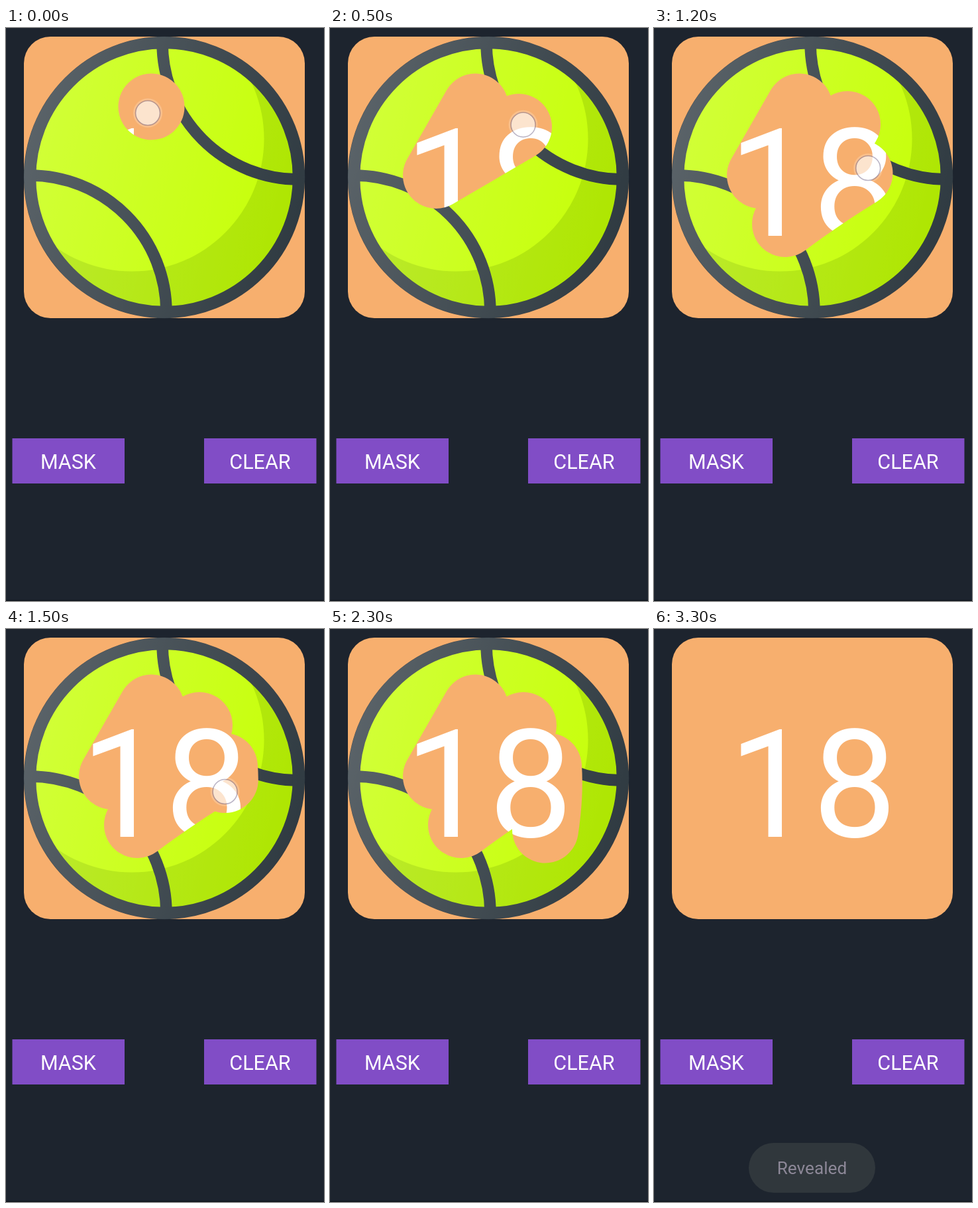
These frames come from a looping animation (480x863 px, 3.4 s). An HTML page:

```html
<!DOCTYPE html>
<html lang="en">
<head>
<meta charset="utf-8">
<title>Scratch card</title>
<style>
  html, body { margin: 0; width: 100%; height: 100%; overflow: hidden; background: #1d242e; }
  svg { display: block; width: 100vw; height: 100vh; }
  text { font-family: Roboto, Arial, sans-serif; fill: #fff; text-anchor: middle; }
  .number { font-size: 226px; }
  .button rect { width: 169.5px; height: 68px; fill: #814dc6; }
  .button text { font-size: 30.5px; }
  .seam { fill: none; stroke: #303b42; stroke-width: 17.5; }
  #scratch { fill: none; stroke: #000; stroke-width: 100; stroke-linecap: round; stroke-linejoin: round; }
  #toast text { font-size: 26.2px; fill: #8d8898; }
</style>
</head>
<body>
<svg viewBox="0 0 480 863">
  <defs>
    <linearGradient id="sheen" gradientUnits="userSpaceOnUse" x1="35" y1="170" x2="443" y2="280">
      <stop offset="0" stop-color="#fff" stop-opacity=".2"/>
      <stop offset="1" stop-color="#fff" stop-opacity="0"/>
    </linearGradient>
    <clipPath id="disc"><circle cx="239" cy="225" r="203"/></clipPath>
    <mask id="unscratched" maskUnits="userSpaceOnUse" x="0" y="0" width="480" height="450">
      <rect width="480" height="450" fill="#fff"/>
      <path id="scratch" d="M219.5 118.5 L160 222 L292 145 L198 295 Q262 247 330 207 Q333 250 325 302.5"/>
    </mask>
  </defs>

  <rect width="480" height="863" fill="#1d242e"/>
  <rect y="861.5" width="480" height="1.5" fill="#10151c"/>

  <rect x="27" y="13" width="424" height="424" rx="40" fill="#f7af6e"/>
  <text class="number" x="239.5" y="313">18</text>

  <g id="ball" mask="url(#unscratched)">
    <g clip-path="url(#disc)">
      <circle cx="239" cy="225" r="203" fill="#aee600"/>
      <circle cx="190" cy="167" r="199.5" fill="#c6ff06"/>
      <circle class="seam" cx="442" cy="22" r="206"/>
      <circle class="seam" cx="36" cy="428" r="206"/>
    </g>
    <circle class="seam" cx="239" cy="225" r="203" style="stroke-width:18.5"/>
    <circle cx="239" cy="225" r="212" fill="url(#sheen)"/>
  </g>

  <g class="button">
    <rect x="9.5" y="618"/>
    <text x="94" y="664">MASK</text>
  </g>
  <g class="button">
    <rect x="299" y="618"/>
    <text x="383.5" y="664">CLEAR</text>
  </g>

  <g id="toast">
    <rect x="143" y="774" width="191" height="75" rx="37.5" fill="#30373c"/>
    <text x="238.5" y="821">Revealed</text>
  </g>

  <g id="finger">
    <circle r="22" fill="#fff" opacity=".2"/>
    <circle r="18" fill="#fff" opacity=".58"/>
    <circle id="rim" r="18.5" fill="none" stroke="#75698c" stroke-width="1.6" opacity=".5"/>
  </g>
</svg>
<script>
  const LOOP = 3400, STEP = 100;
  const LIFT = 2100, TAP = 2800, REVEAL = 3100;
  const $ = id => document.getElementById(id);
  const scratch = $('scratch'), finger = $('finger');

  // time, scratched length, finger position along the same path
  const drag = [
    [0, 0, 11], [200, 112, 122], [300, 155, 172], [500, 264, 273],
    [600, 290, 315], [800, 440, 454], [900, 471, 512], [1200, 585, 600],
    [1500, 628, 646], [1900, 690, 699], [2000, 705, 705]
  ];

  function at(time, column) {
    const i = drag.findIndex(key => key[0] > time);
    if (i < 0) return drag[drag.length - 1][column];
    const a = drag[i - 1], b = drag[i];
    return a[column] + (b[column] - a[column]) * (time - a[0]) / (b[0] - a[0]);
  }

  const show = (el, on) => el.setAttribute('visibility', on ? 'visible' : 'hidden');

  function draw(now) {
    const time = Math.floor(now % LOOP / STEP) * STEP;
    scratch.setAttribute('stroke-dasharray', `${at(time, 1) + 0.1} 9999`);

    const dragging = time < LIFT, tapping = time >= TAP && time < REVEAL;
    const p = dragging ? scratch.getPointAtLength(at(time, 2)) : { x: 389, y: 668 };
    finger.setAttribute('transform', `translate(${p.x} ${p.y})`);
    show(finger, dragging || tapping);
    show($('rim'), dragging);

    show($('ball'), time < REVEAL);
    $('toast').setAttribute('opacity', Math.max(0, Math.min(1, (time - REVEAL) / 200)));
  }

  const start = performance.now();
  function tick() {
    draw(performance.now() - start);
    requestAnimationFrame(tick);
  }
  tick();
</script>
</body>
</html>
```
